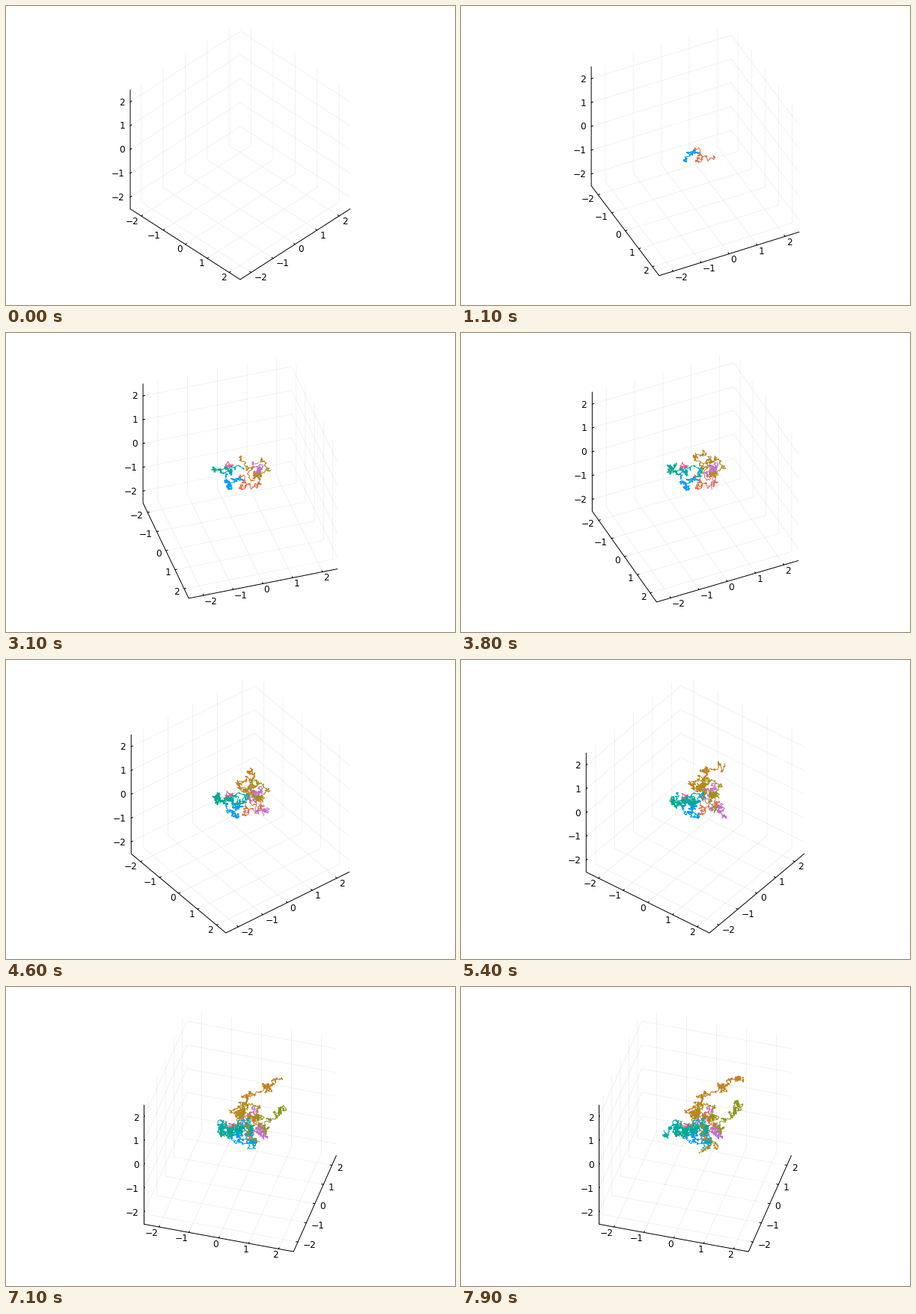
These frames come from a looping animation (600 px wide and 400 px high, 8000 ms). A matplotlib script:

```python
import numpy as np
import matplotlib.pyplot as plt
from matplotlib.animation import FuncAnimation

W, H, DPI = 600, 400, 100
FRAMES, INTERVAL = 80, 100
CX, CY, SCALE = 312.9, 191.9, 41.55
LIM, TICK = 2.5, 0.06
ELEV = np.radians(40)
SE, CE = np.sin(ELEV), np.cos(ELEV)
PX = 72 / DPI
FONT = 8.7
HALF_DIGIT = 0.729 * FONT / PX / 2
SUBSTEPS, SIGMA = 10, 0.03

rng = np.random.default_rng(7)

fig = plt.figure(figsize=(W / DPI, H / DPI), dpi=DPI, facecolor="white")
ax = fig.add_axes([0, 0, 1, 1])
ax.set_xlim(0, W)
ax.set_ylim(H, 0)
ax.axis("off")


def line(color, width, **kw):
    return ax.plot([], [], color=color, lw=width * PX, **kw)[0]


def project(p, a):
    """Orthographic view of points (x, y, z) at angle a, in pixels."""
    x, y, z = np.asarray(p, float).T
    s, c = np.sin(a), np.cos(a)
    return (CX + SCALE * (x * s + y * c),
            CY + SCALE * (SE * (x * c - y * s) - CE * z))


walks = []


def walk(color, birth, death, *points):
    """Random walk pinned to points that are evenly spaced in time."""
    n = (death - birth) * SUBSTEPS
    t = np.linspace(0, len(points) - 1, n + 1)
    pins = np.arange(len(points))
    noise = rng.normal(0, SIGMA, (n + 1, 3)).cumsum(0)
    path = np.empty_like(noise)
    for i, goal in enumerate(np.transpose(points)):
        drift = np.interp(pins, t, noise[:, i])
        path[:, i] = noise[:, i] + np.interp(t, pins, goal - drift)
    walks.append((birth, path, line(color, 1, zorder=3)))


ORIGIN = (0, 0, 0)
LEFT, RIGHT = (-.2, -.35, .25), (.4, .47, .35)
MIDDLE = (.3, -.05, .3)

walk("#009AFA", 0, 22, ORIGIN, (.37, -.5, 0), LEFT)
walk("#E36F47", 0, 20, ORIGIN, (.56, .41, -.1), RIGHT)
walk("#C371D2", 20, 60, RIGHT, (-.2, .5, .3), (.4, .7, -.35),
     (.5, .8, -.55), (.6, .8, -.6))
walk("#AC8E18", 20, 60, RIGHT, (-.1, .2, .45), (-.47, .1, .2))
walk("#ED5E93", 20, 26, LEFT, (-.2, -.3, .45))
walk("#00AAAE", 22, 80, LEFT, (-.25, -.3, .1), (-.93, -.3, -.1))
walk("#C68225", 20, 80, RIGHT, (-.25, .3, .6), (.66, .37, 1.85),
     (.85, .42, 1.6), (1.4, .65, 1.83))
walk("#00A98D", 22, 80, LEFT, (.1, -.15, .35), MIDDLE)
walk("#8E971E", 42, 78, RIGHT, (.85, -.2, .3), (1.26, .3, 1.05),
     (1.35, .25, 1.3))
walk("#00A9CC", 54, 72, MIDDLE, (.6, -.5, -.1), (.5, -.2, .1))
walk("#AC8E18", 66, 80, MIDDLE, (.4, -.55, -.46))


def box_point(pairs):
    """Point from {axis: value}; the other coordinates sit at -LIM."""
    p = [-LIM] * 3
    for axis, value in pairs.items():
        p[axis] = value
    return p


X, Y, Z = range(3)
lines = [(line("black", 1, zorder=2),
          [(-LIM, -LIM, LIM), (-LIM, -LIM, -LIM),
           (LIM, -LIM, -LIM), (LIM, LIM, -LIM)])]
labels = []


def add_tick(axis, value):
    # Each grid line runs over one face to the far side, then along the next.
    near, cross, rise = {X: (-LIM, Y, Z), Y: (LIM, X, Z), Z: (-LIM, Y, X)}[axis]
    start = box_point({axis: value, cross: near})
    turn = box_point({axis: value, cross: -near})
    end = box_point({axis: value, cross: -near, rise: LIM})
    mark = box_point({axis: value, cross: near - np.sign(near) * TICK})
    lines.append((line("black", 0.8, alpha=0.065, zorder=1), [start, turn, end]))
    lines.append((line("black", 1, zorder=2), [start, mark]))
    text = ax.text(0, 0, str(value).replace("-", "\u2212"), size=FONT,
                   family="DejaVu Sans", va="baseline", zorder=4,
                   ha="left" if axis == Y else "right")
    labels.append((text, axis, start))


for axis in (X, Y, Z):
    for value in range(-2, 3):
        add_tick(axis, value)


def label_offset(axis, a):
    """Push labels outward, at right angles to the drawn axis."""
    if axis == Z:
        return -7, 0
    s, c = np.sin(a), np.cos(a)
    n = np.array([-c * SE, s] if axis == X else [s * SE, c])
    dx, dy = 7.6 * n / np.hypot(*n)
    return dx + (1 if axis == X else -0.3), dy


def update(k):
    a = np.radians(45 - 30 * np.sin(2 * np.pi * k / 100))
    for artist, pts in lines:
        artist.set_data(*project(pts, a))
    for text, axis, anchor in labels:
        x, y = project(anchor, a)
        dx, dy = label_offset(axis, a)
        text.set_position((x + dx, y + dy + HALF_DIGIT))
    for birth, path, artist in walks:
        n = max(0, (k - birth) * SUBSTEPS)
        artist.set_data(*project(path[:n], a))
    return []


anim = FuncAnimation(fig, update, frames=FRAMES, interval=INTERVAL,
                     init_func=lambda: update(0), repeat=True,
                     repeat_delay=0, cache_frame_data=False)
plt.show()
```
